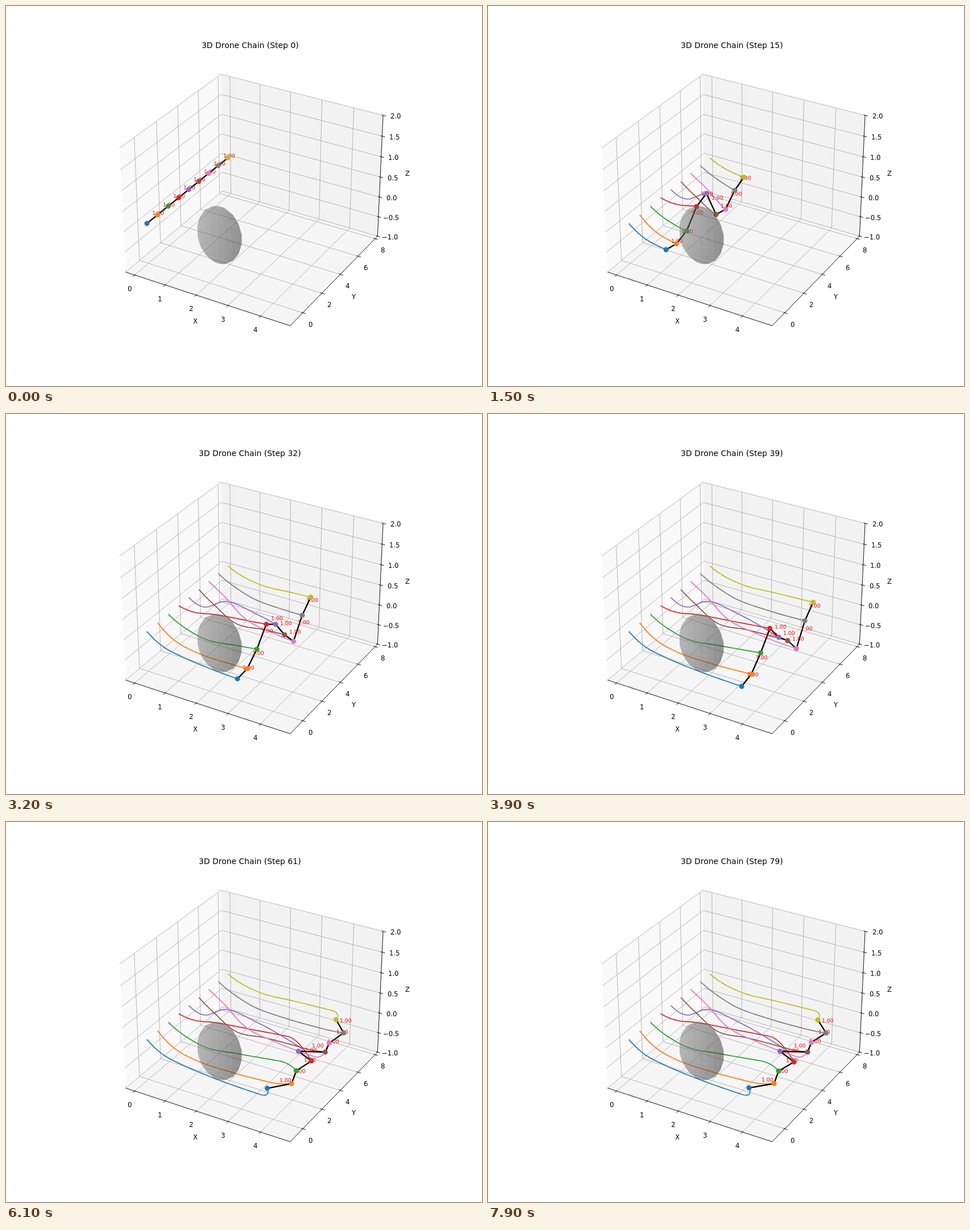
An HTML page with a canvas for the animation above (8 s loop, 837 by 669 pixels).

```html
<!DOCTYPE html>
<html>
<head>
<meta charset="utf-8">
<style>
  html, body { margin: 0; width: 100%; height: 100%; overflow: hidden; background: #fff; }
  canvas { display: block; }
</style>
</head>
<body>
<canvas id="stage" width="837" height="669"></canvas>
<script>
const g = document.getElementById('stage').getContext('2d');
const FONT = '"DejaVu Sans", sans-serif';
const STEPS = 80, STEP_MS = 100;

// Axis limits and perspective camera (elevation 30°, azimuth -60°)
const X0 = -0.3, X1 = 4.9, Y0 = -1.28, Y1 = 8.294, Z0 = -1, Z1 = 2;
const K = 0.29762, SCALE = 2784.5, CX = 435.9, CY = 330.9;

function project([x, y, z]) {
  const a = K * (4 * (x - X0) / (X1 - X0) - 2);
  const b = K * (4 * (y - Y0) / (Y1 - Y0) - 2);
  const c = K * (3 * (z - Z0) / (Z1 - Z0) - 1.5);
  const depth = 10 - (0.433 * a - 0.75 * b + 0.5 * c);
  return [
    CX + SCALE * (0.866 * a + 0.5 * b) / depth,
    CY - SCALE * (-0.25 * a + 0.433 * b + 0.866 * c) / depth,
    depth
  ];
}

const range = (from, to, gap) =>
  Array.from({ length: Math.round((to - from) / gap) + 1 }, (_, i) => from + i * gap);

function trace(pts) {
  g.beginPath();
  pts.forEach(p => g.lineTo(p[0], p[1]));
}

function line(pts, color, width) {
  trace(pts);
  g.strokeStyle = color;
  g.lineWidth = width;
  g.stroke();
}

function fill(pts, color) {
  trace(pts);
  g.closePath();
  g.fillStyle = color;
  g.fill();
}

// Glyphs sit on whole pixels
function text(str, x, y, size, color = '#000', align = 0.5) {
  g.font = size + 'px ' + FONT;
  g.fillStyle = color;
  g.fillText(str, Math.round(x - align * g.measureText(str).width), Math.round(y));
}

// Drones leave the line x = z = 0, drift right together while their heights
// pass a few key values, then settle like damped springs at their end points.
const KEYS = [0, 8, 15, 26, 39], ARRIVE = 39, SETTLE = 4.5;
const drones = [];

const drift = s => 5.6 * s - 20 * Math.tanh(s / 9);

function spring(from, to, speed, s) {
  const gap = from - to;
  return to + (gap + (speed + gap / SETTLE) * s) * Math.exp(-s / SETTLE);
}

// Smooth curve through values at the key steps
function curve(values) {
  const n = KEYS.length - 1;
  const h = i => KEYS[i + 1] - KEYS[i];
  const rise = i => (values[i + 1] - values[i]) / h(i);
  const inner = i => (h(i - 1) * rise(i) + h(i) * rise(i - 1)) / (h(i - 1) + h(i));
  const slope = i =>
    i === 0 ? 1.5 * rise(0) - 0.5 * inner(1) :
    i === n ? 1.5 * rise(n - 1) - 0.5 * inner(n - 1) : inner(i);
  const at = s => {
    let i = 0;
    while (i < n - 1 && s >= KEYS[i + 1]) i++;
    const u = (s - KEYS[i]) / h(i), w = 1 - u;
    return w * w * (1 + 2 * u) * values[i] + u * u * (3 - 2 * u) * values[i + 1]
      + h(i) * u * w * (w * slope(i) - u * slope(i + 1));
  };
  return { at, endSpeed: slope(n) };
}

function drone(color, heights, [endX, endY]) {
  const i = drones.length;
  const [x0, y0] = project([0, i, 0]);
  const pace = 1 - 0.0105 * i;
  const x = s => x0 + pace * drift(s);
  const y = curve([y0, ...heights]);
  const path = range(0, STEPS - 1, 1).map(s => {
    const rest = s - ARRIVE;
    return rest <= 0 ? [x(s), y.at(s)] : [
      spring(x(ARRIVE), endX, 5.6 * pace, rest),
      spring(y.at(ARRIVE), endY, y.endSpeed, rest)
    ];
  });
  drones.push({ color, path });
}

drone('#1f77b4', [411, 429, 454, 479.5], [459, 468]);
drone('#ff7f0e', [399, 418.5, 439, 458], [503, 460.5]);
drone('#2ca02c', [377, 396, 408, 420.5], [511, 438.5]);
drone('#d62728', [349.5, 353, 364, 377.5], [538, 422.5]);
drone('#9467bd', [340, 330, 353, 393], [513.5, 403.5]);
drone('#8c564b', [338, 367, 380.5, 399], [562, 405]);
drone('#e377c2', [322, 358, 387.5, 413], [568.5, 388]);
drone('#7f7f7f', [304, 324.5, 345, 364], [594.5, 371.5]);
drone('#bcbd22', [287, 301.5, 315, 331.5], [580, 348.5]);

// Shaded translucent ball, far facets first
const ball = [];
const SEG = 19, RINGS = 9;
function normal(i, j) {
  const u = 2 * Math.PI * i / SEG, v = Math.PI * j / RINGS;
  return [Math.cos(u) * Math.sin(v), Math.sin(u) * Math.sin(v), Math.cos(v)];
}
for (let i = 0; i < SEG; i++) {
  for (let j = 0; j < RINGS; j++) {
    const n = normal(i + 0.5, j + 0.5);
    const pts = [[i, j], [i + 1, j], [i + 1, j + 1], [i, j + 1]].map(([a, b]) => {
      const [x, y, z] = normal(a, b);
      return project([2 + 0.68 * x, 1 + 0.68 * y, -0.043 + 0.68 * z]);
    });
    const light = 0.65 + 0.35 * (-0.667 * n[0] - 0.667 * n[1] + 0.333 * n[2]);
    const tone = Math.round(128 * light);
    const depth = pts.reduce((sum, p) => sum + p[2], 0);
    ball.push({ pts, depth, color: `rgba(${tone},${tone},${tone},0.3)` });
  }
}
ball.sort((a, b) => b.depth - a.depth);

function drawAxes() {
  const quad = (color, ...pts) => fill(pts.map(project), color);
  quad('#f9f9f9', [X0, Y0, Z0], [X0, Y1, Z0], [X0, Y1, Z1], [X0, Y0, Z1]);
  quad('#f2f2f2', [X0, Y1, Z0], [X1, Y1, Z0], [X1, Y1, Z1], [X0, Y1, Z1]);
  quad('#f5f5f5', [X0, Y0, Z0], [X1, Y0, Z0], [X1, Y1, Z0], [X0, Y1, Z0]);

  const rule = (color, ...pts) => line(pts.map(project), color, 0.93);
  const label = (str, p, dx, dy) => {
    const [x, y] = project(p);
    text(str, x + dx, y + dy + 4.2, 11.63);
  };
  const xs = range(0, 4, 1), ys = range(0, 8, 2), zs = range(Z0, Z1, 0.5);
  const grid = '#b0b0b0', ink = '#000';
  const dx = (X1 - X0) / 120, dy = (Y1 - Y0) / 120;

  xs.forEach(x => rule(grid, [x, Y0, Z0], [x, Y1, Z0], [x, Y1, Z1]));
  ys.forEach(y => rule(grid, [X1, y, Z0], [X0, y, Z0], [X0, y, Z1]));
  zs.forEach(z => rule(grid, [X0, Y0, z], [X0, Y1, z], [X1, Y1, z]));
  rule(ink, [X0, Y0, Z0], [X1, Y0, Z0], [X1, Y1, Z0], [X1, Y1, Z1]);

  xs.forEach(x => {
    rule(ink, [x, Y0 + dy, Z0], [x, Y0 - 2 * dy, Z0]);
    label(x, [x, Y0, Z0], -8.7, 24.2);
  });
  ys.forEach(y => {
    rule(ink, [X1 - dx, y, Z0], [X1 + 2 * dx, y, Z0]);
    label(y, [X1, y, Z0], 13.4, 20.5);
  });
  zs.forEach(z => {
    rule(ink, [X1 - dx, Y1, z], [X1 + 2 * dx, Y1, z]);
    label(z.toFixed(1).replace('-', '\u2212'), [X1, Y1, z], 21.8, 1.5);
  });
  text('X', 333, 559, 11.63);
  text('Y', 612, 516, 11.63);
  text('Z', 706, 299, 11.63);
}

function draw(step) {
  g.fillStyle = '#fff';
  g.fillRect(0, 0, 837, 669);
  g.lineJoin = 'round';
  drawAxes();
  text(`3D Drone Chain (Step ${step})`, 429, 74, 13.95);

  drones.forEach(d => line(d.path.slice(0, step + 1), d.color, 1.74));
  const now = drones.map(d => d.path[step]);
  line(now, '#000', 2.33);

  for (let i = 1; i < now.length; i++) {
    const [a, b] = [now[i - 1], now[i]];
    text('1.00', (a[0] + b[0]) / 2, (a[1] + b[1]) / 2 - 7.1, 9.3, '#f00', 0);
  }
  now.forEach(([x, y], i) => {
    g.beginPath();
    g.arc(x, y, 4.5, 0, 2 * Math.PI);
    g.fillStyle = drones[i].color;
    g.fill();
  });
  ball.forEach(f => fill(f.pts, f.color));
}

const start = performance.now();
function tick() {
  draw(Math.floor((performance.now() - start) / STEP_MS) % STEPS);
  requestAnimationFrame(tick);
}
tick();
</script>
</body>
</html>
```
